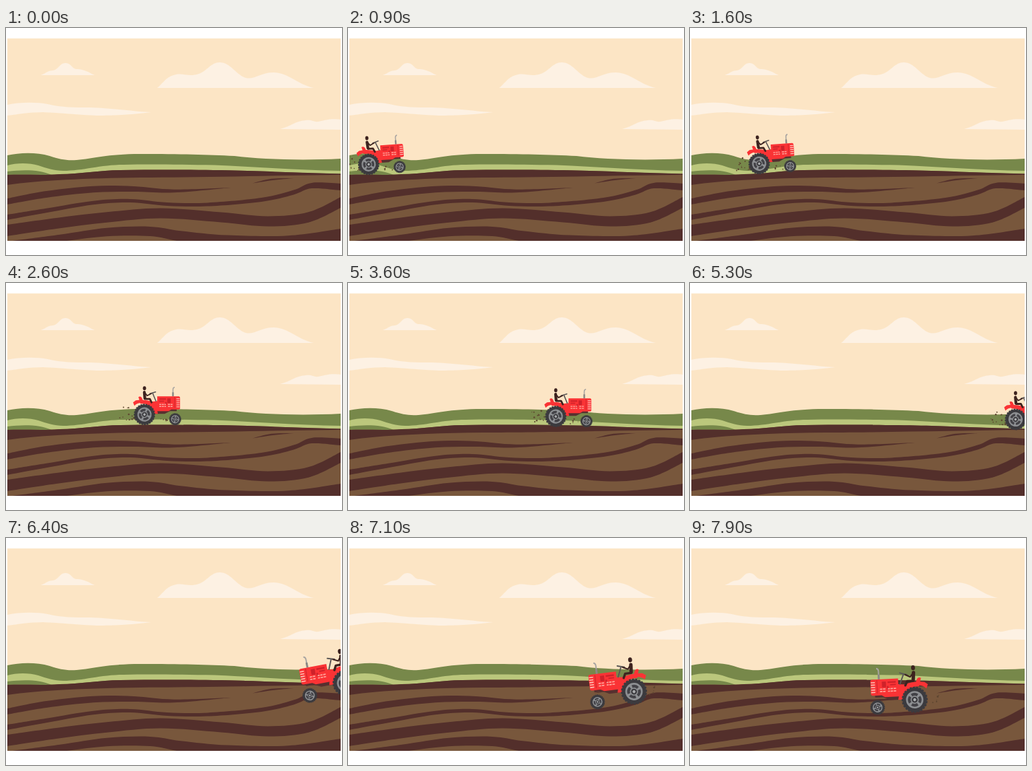
Animation of 500 by 337 pixels, one loop 8000 ms. Source, as an HTML page:

```html
<!DOCTYPE html>
<html lang="en">
<head>
<meta charset="utf-8">
<title>Tractor in a field</title>
<style>
html, body { margin: 0; width: 100%; height: 100%; overflow: hidden; background: #fff; }
svg { display: block; width: 500px; height: 337px; }
</style>
</head>
<body>
<svg viewBox="0 0 500 337">
  <defs>
    <clipPath id="stage"><rect x="2" y="15.5" width="496" height="300.5"/></clipPath>
    <g id="wheel">
      <circle r="14.8" fill="#3b3a3e"/>
      <circle r="15" fill="none" stroke="#3b3a3e" stroke-width="1.8" stroke-dasharray="2.6 1.33"/>
      <circle r="10.6" fill="#8d8f92"/>
      <circle r="6.6" fill="none" stroke="#434247" stroke-width="3.4" stroke-dasharray="7.6 2.77"/>
      <circle r="3.6" fill="#3b3a3e"/>
      <circle r="1.8" fill="#a9abad"/>
    </g>
  </defs>
  <g clip-path="url(#stage)">
    <rect width="500" height="337" fill="#fce5c5"/>
    <g fill="#fdf1e3">
      <path d="M52 70C60 67 62 63 70 63C78 62 80 52 88 52C97 52 98 60 104 61C114 60 124 66 132 70Z"/>
      <path d="M225 89C234 82 238 72 253 69C264 67 273 73 287 68C299 64 305 51 318 51C333 51 342 68 354 73C368 79 378 66 398 66C422 67 434 84 458 89Z"/>
      <path d="M2 114C20 110 46 110 62 113C84 118 100 118 125 118C160 119 190 124 216 125C195 128 160 130 135 130C110 129 80 126 55 125C35 125 18 128 2 130Z"/>
      <path d="M408 150C424 146 430 138 446 137C456 136 458 140 465 139C476 137 482 134 498 136V151Z"/>
    </g>
    <path fill="#77884a" d="M2 189C20 185 45 184 65 190C80 195 90 197 105 196C130 194 150 187 200 187C260 187 300 188 340 190C380 195 440 197 498 194V222H2Z"/>
    <path fill="#bbc77c" d="M2 204C15 200 35 200 48 204C60 208 72 212 85 212C115 212 140 203 175 203C220 202 260 203 310 203.5C370 206 430 211 498 212V222H2Z"/>
    <path fill="#77884a" d="M2 213C25 210 50 210 68 218V222H2Z"/>
    <path fill="#78573c" d="M2 218C30 217 55 219 80 217C110 217 140 211 170 211C260 210 350 211 400 213.5C440 215 470 216 498 216.5V316H2Z"/>
    <path fill="#532f2b" d="M2 218C30 217 55 219 80 217C110 217 140 211 170 211C260 210 350 211 400 213.5L498 216.5V218C400 219 280 222 200 222C120 223 50 226 2 233Z"/>
    <g id="soil" fill="#532f2b"></g>
    <g id="rig">
      <g id="dust" fill="#5e4630"></g>
      <g transform="translate(0 -2)">
        <path d="M14 -8H48V-3H38L30 1H12Z" fill="#57302f"/>
        <path d="M42.4 -25V-35Q42.4 -38 45 -38.4" fill="none" stroke="#aaa6a2" stroke-width="1.6"/>
        <path d="M42.4 -25V-31" stroke="#8b8783" stroke-width="2.4"/>
        <path d="M-9 -24Q-6 -26 -4 -23L-2 -18H9V-14H-6Z" fill="#fa3335"/>
        <path d="M19 -25H51Q53 -25 53 -22V-7Q52.5 -5.5 50.5 -5.5H40L36 -3H16L10 -9V-17L19 -18Z" fill="#fa3335"/>
        <path d="M-17 -16L-13 -19Q0 -21 12 -17Q18 -11 20 1H14Q9 -12 -3 -15Q-10 -16 -15 -11Z" fill="#fa3335"/>
        <path d="M22 -22H32V-20H22ZM22 -18.5H29V-17H22ZM34 -22H39V-15H34ZM31 -16.5H33V-12H31Z" fill="#cf222a"/>
        <path d="M22 -13H32M22 -10H32M35 -13H42M35 -10H42" stroke="#ffa69c" stroke-width="1.4" stroke-dasharray="3 .8"/>
        <path d="M45 -24V-8" stroke="#d3262c"/>
        <path d="M50 -22V-8" stroke="#ffc0b5" stroke-width="5" stroke-dasharray="1.3 1.7"/>
        <path d="M12 -30L17 -18M8 -29L16.5 -31.5" fill="none" stroke="#5a5655" stroke-width="1.6" stroke-linecap="round"/>
        <g fill="none" stroke="#3d231f" stroke-linecap="round" stroke-linejoin="round">
          <path d="M-.2 -31L.6 -22" stroke-width="4.2"/>
          <path d="M1 -21L8 -21L10.5 -16" stroke-width="2.8"/>
          <path d="M.5 -30.5L4 -26L10 -29" stroke-width="1.8"/>
        </g>
        <ellipse cy="-37" rx="2.4" ry="3" fill="#3d231f"/>
      </g>
      <use id="rear" href="#wheel"/>
      <use id="front" href="#wheel"/>
    </g>
  </g>
</svg>
<script>
const NS = 'http://www.w3.org/2000/svg';
const $ = id => document.getElementById(id);
const set = (el, attrs) => { for (const k in attrs) el.setAttribute(k, attrs[k]); };
const add = (parent, tag, attrs) => {
  const el = document.createElementNS(NS, tag);
  set(el, attrs);
  return parent.appendChild(el);
};

// Smooth curve through a list of points
function curve(pts) {
  let d = '';
  for (let i = 0; i < pts.length - 1; i++) {
    const b = pts[i], c = pts[i + 1], a = pts[i - 1] || b, e = pts[i + 2] || c;
    d += `C${b[0] + (c[0] - a[0]) / 6} ${b[1] + (c[1] - a[1]) / 6} ` +
         `${c[0] - (e[0] - b[0]) / 6} ${c[1] - (e[1] - b[1]) / 6} ${c[0]} ${c[1]}`;
  }
  return d;
}

// Furrow along a centre line, its height running from h0 through mid to h1
function furrow(h0, mid, h1, ...line) {
  const edge = side => line.map(([x, y], i) => {
    const k = i / (line.length - 1);
    const h = h0 * (1 - k) + h1 * k + (mid - (h0 + h1) / 2) * 4 * k * (1 - k);
    return [x, y + side * h / 2];
  });
  const top = edge(-1), low = edge(1).reverse();
  add($('soil'), 'path', { d: `M${top[0]}${curve(top)}L${low[0]}${curve(low)}Z` });
}

furrow(9, 9, 0, [2, 257.5], [60, 247], [130, 239.5], [190, 239], [250, 242], [335, 237]);
furrow(0, 2.5, 0, [365, 231], [395, 225], [428, 223]);
furrow(8, 5, 10, [2, 281], [60, 271], [130, 259.5], [185, 256.5], [240, 261.5], [300, 262],
  [380, 255], [428, 244], [455, 234], [498, 236]);
furrow(17, 15, 16, [2, 300.5], [75, 290], [150, 281], [230, 275], [320, 281], [390, 287], [450, 281], [498, 259]);
furrow(8, 15, 18, [2, 321], [80, 312], [150, 303], [215, 302], [260, 309], [330, 316], [420, 317], [498, 307]);

let seed = 11;
const rand = () => (seed = seed * 16807 % 2147483647) / 2147483647;
const grains = Array.from({ length: 20 }, (_, i) => ({
  el: add($('dust'), 'circle', { r: 0.5 + rand() * 0.8 }),
  mid: i > 14, phase: rand(), rise: rand(), reach: 0.7 + rand() * 0.3
}));

const ease = k => { k = Math.min(1, Math.max(0, k)); return k * k * (3 - 2 * k); };

// Rightwards over the low rise in the field, s in seconds
function going(s) {
  const x = 103.1 * s - 62;
  return { x, y: 202.5 - 8 * Math.exp(-(((x - 235) / 95) ** 2)), tilt: 4 * ease(s - 1.6) - 4, size: '1' };
}

// Back to the left, nearer and downhill
function returning(s) {
  return { x: 551 - 114 * s, y: 207 + 21.5 * s - 2.15 * s * s, tilt: 12.5 - 5 * s, size: '-1.22 1.22' };
}

function draw(t) {
  const home = t >= 6000;
  const shown = home || t < 5700;
  set($('rig'), { visibility: shown ? 'visible' : 'hidden' });
  if (!shown) return;
  const { x, y, tilt, size } = home ? returning(t / 1000 - 6) : going(t / 1000);
  set($('rig'), { transform: `translate(${x} ${y}) scale(${size}) rotate(${tilt})` });
  const spin = t * 0.36;
  set($('rear'), { transform: `rotate(${spin})` });
  set($('front'), { transform: `translate(45.7 7) rotate(${spin * 1.75}) scale(.57)` });
  grains.forEach((g, i) => {
    const p = (t / 700 + g.phase) % 1;
    set(g.el, {
      cx: g.mid ? 36 - p * 15 : -13 - p * 26 * g.reach,
      cy: g.mid ? 12 - g.rise * 9 * Math.sin(p * 3) : 8 - g.rise * 20 * Math.sin(p * 2.4),
      opacity: home && i > 4 ? 0 : 1
    });
  });
}

const LOOP = 8000, STEP = 100;
const start = performance.now();
function tick(now) {
  const t = Math.max(0, now - start) % LOOP;
  draw(Math.floor(t / STEP) * STEP);
  requestAnimationFrame(tick);
}
draw(0);
requestAnimationFrame(tick);
</script>
</body>
</html>
```
